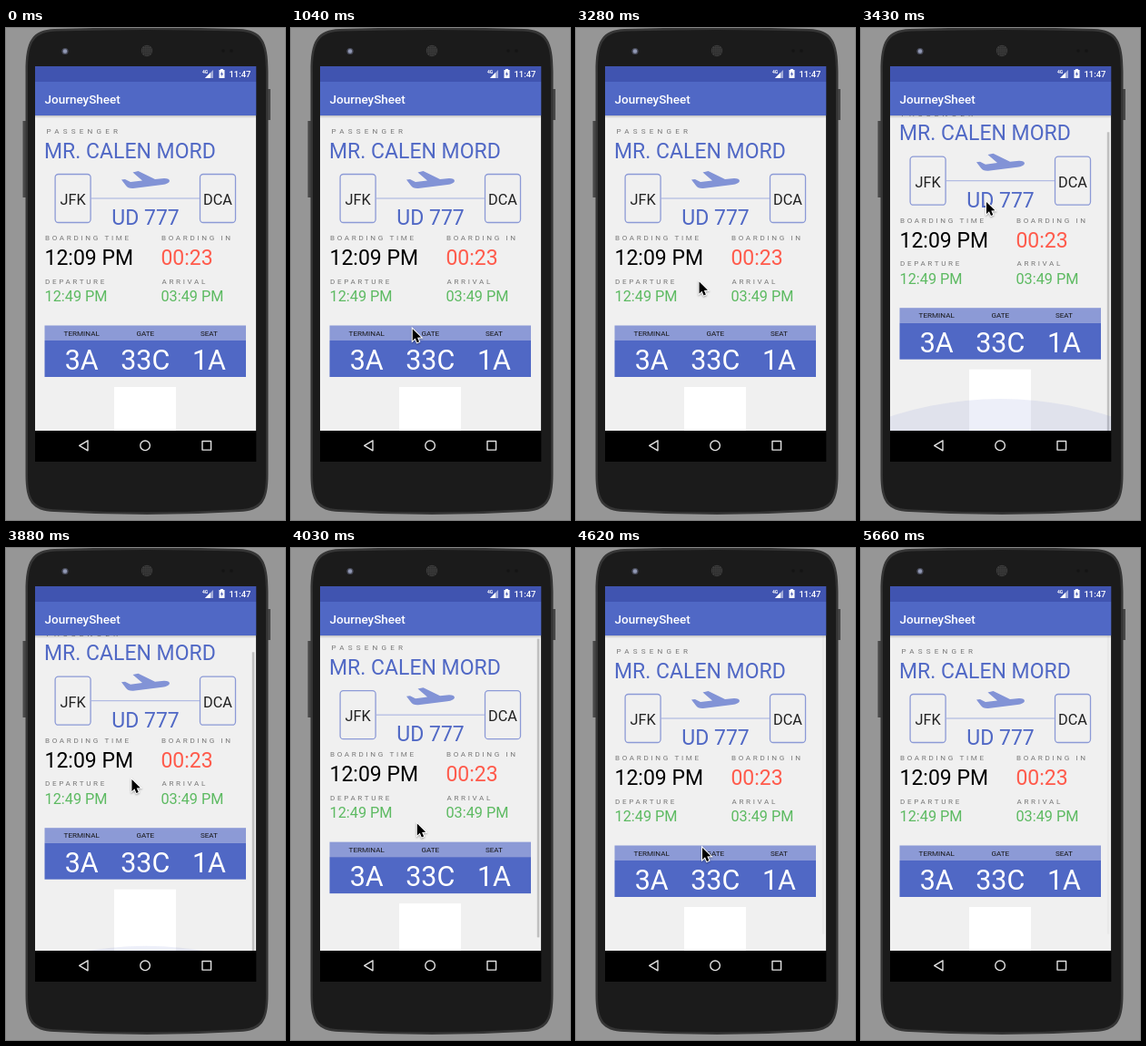
An HTML page with a canvas for the animation above (6060 ms loop, 307x540 px).

```html
<!DOCTYPE html>
<html lang="en">
<head>
<meta charset="utf-8">
<title>Boarding card</title>
<style>
  html, body { margin: 0; width: 100%; height: 100%; overflow: hidden; background: #969696; }
  canvas { display: block; width: 307px; height: 540px; }
</style>
</head>
<body>
<canvas id="stage"></canvas>
<script>
const W = 307, H = 540, LOOP = 6060;
const TICK = 148.75;
const SCREEN = { x: 32, w: 243.3 };
const VIEW = { top: 96, bottom: 442, h: 346 };
const MAX_SCROLL = 19.3;
const BLUE = '#5068c5', PALE = '#8c9ad6', GREEN = '#5dba62', RED = '#ff5b4c', GREY = '#777';

const canvas = document.getElementById('stage');
const ctx = canvas.getContext('2d');
const dpr = window.devicePixelRatio || 1;
canvas.width = W * dpr;
canvas.height = H * dpr;

const clamp = (v, lo, hi) => Math.min(hi, Math.max(lo, v));
const easeIn = n => p => p ** n;
const easeOut = n => p => 1 - (1 - p) ** n;
const linear = easeIn(1);

// Pointer gestures; from and to are counted in ticks.
const SHOWN = { from: 6, to: 38, x: 83, y: 444 };
const GESTURES = [
  { from: 6, to: 8, x: 141, y: 314, ease: easeOut(3) },
  { from: 13, to: 14, x: 140, y: 306, ease: linear },
  { from: 14, to: 15, x: 141, y: 186, ease: linear },
  { from: 16, to: 18, x: 138, y: 285, ease: easeIn(3) },
  { from: 18, to: 21, x: 135, y: 299, ease: linear },
  { from: 21, to: 23, x: 138, y: 191, ease: easeIn(2.4) },
  { from: 25, to: 28, x: 139, y: 329, ease: easeOut(1.5) },
  { from: 34, to: 37, x: 262, y: 504, ease: easeOut(1.7) }
];
const PUSH_END = 23, PULL_END = 28, GRAB_Y = 287;

function pointerAt(tick) {
  let { x, y } = SHOWN;
  for (const g of GESTURES) {
    const p = g.ease(clamp((tick - g.from) / (g.to - g.from), 0, 1));
    x += (g.x - x) * p;
    y += (g.y - y) * p;
  }
  return { x, y, visible: tick >= SHOWN.from && tick < SHOWN.to };
}

// After the push the list rests at its end, then follows the pointer back down.
const scrollAt = (tick, pointerY) =>
  tick < PUSH_END ? 0 : clamp(MAX_SCROLL - (pointerY - GRAB_Y), 0, MAX_SCROLL);

const barAlphaAt = tick =>
  tick < PUSH_END ? 0 : .2 * clamp(1 - (tick - PULL_END) / 3, .15, 1);

function glowAt(tick, start, duration, height) {
  const p = (tick - start) / duration;
  return p < 0 || p >= 1 ? 0 : height * (1 + Math.cos(Math.PI * p)) / 2;
}

function rect(x, y, w, h, color) {
  ctx.fillStyle = color;
  ctx.fillRect(x, y, w, h);
}

function circle(x, y, r, color) {
  ctx.fillStyle = color;
  ctx.beginPath();
  ctx.arc(x, y, r, 0, Math.PI * 2);
  ctx.fill();
}

function polygon(...points) {
  ctx.beginPath();
  points.forEach(([x, y]) => ctx.lineTo(x, y));
  ctx.closePath();
}

function text(str, x, y, size, color, { align = 'left', weight = 400, spacing = 0 } = {}) {
  ctx.font = `${weight} ${size}px Roboto, sans-serif`;
  ctx.letterSpacing = spacing + 'px';
  ctx.textAlign = align;
  ctx.fillStyle = color;
  ctx.fillText(str, x, y);
}

function fillBody(inset, color) {
  const l = 21.5 + inset, r = 288.5 - inset, t = inset, b = 534 - inset;
  ctx.beginPath();
  ctx.moveTo(l, 48);
  ctx.bezierCurveTo(l, 14, l + 7, t + 2, l + 32, t + 1);
  ctx.quadraticCurveTo(155, t - 2, r - 32, t + 1);
  ctx.bezierCurveTo(r - 7, t + 2, r, 14, r, 48);
  ctx.lineTo(r, 490);
  ctx.bezierCurveTo(r, 520, r - 7, b - 4, r - 32, b - 3);
  ctx.quadraticCurveTo(155, b + 3, l + 32, b - 3);
  ctx.bezierCurveTo(l + 7, b - 4, l, 520, l, 490);
  ctx.closePath();
  ctx.fillStyle = color;
  ctx.fill();
}

function drawPhone() {
  rect(0, 0, W, H, '#969696');
  rect(18.5, 102, 4, 84, '#484848');
  rect(287, 67, 4, 34, '#484848');
  fillBody(0, '#353535');
  fillBody(2.5, '#1b1b1b');
  circle(65, 25.5, 3.6, '#4a4d5c');
  circle(65, 25.5, 2.2, '#9198b4');
  circle(155, 25, 6.2, '#3c3c3c');
  for (let i = -2; i <= 2; i++) {
    for (let j = -2; j <= 2; j++) {
      if (i * i + j * j < 6) circle(155 + i * 2.2, 25 + j * 2.2, .6, '#1c1c1c');
    }
  }
  circle(239, 25, 1.8, '#141414');
  circle(248, 25, 1.8, '#141414');
}

function drawBars() {
  const shade = ctx.createLinearGradient(0, VIEW.top, 0, VIEW.top + 3);
  shade.addColorStop(0, 'rgba(0,0,0,.2)');
  shade.addColorStop(1, 'rgba(0,0,0,0)');
  rect(SCREEN.x, VIEW.top, SCREEN.w, 3, shade);

  rect(SCREEN.x, 42, SCREEN.w, 17, '#4054b0');
  rect(SCREEN.x, 59, SCREEN.w, 37, BLUE);
  text('JourneySheet', 42.5, 82.5, 13.5, '#fff', { weight: 500 });

  text('4G', 216, 50, 5, '#fff', { weight: 700 });
  polygon([219, 55], [228, 55], [228, 46]);
  ctx.fillStyle = 'rgba(255,255,255,.5)';
  ctx.fill();
  polygon([219, 55], [225, 55], [225, 49]);
  ctx.fillStyle = '#fff';
  ctx.fill();
  rect(236, 45, 3, 2, '#fff');
  rect(234.5, 46, 6, 9, '#fff');
  polygon([238, 47.5], [236, 51], [237.3, 51], [237, 53.5], [239, 50], [237.8, 50]);
  ctx.fillStyle = '#4054b0';
  ctx.fill();
  text('11:47', 269.5, 54, 9.5, '#fff', { weight: 500, align: 'right' });

  rect(SCREEN.x, VIEW.bottom, SCREEN.w, 34, '#000');
  ctx.strokeStyle = '#e2e2e2';
  ctx.lineWidth = 1.4;
  ctx.lineJoin = 'round';
  polygon([80.7, 458.3], [90, 452.8], [90, 463.8]);
  ctx.stroke();
  ctx.beginPath();
  ctx.arc(153.1, 458.3, 5.3, 0, Math.PI * 2);
  ctx.stroke();
  ctx.strokeRect(216, 453.5, 9.6, 9.6);
}

function drawPlane() {
  ctx.fillStyle = '#8293d6';
  ctx.beginPath();
  ctx.moveTo(127, 166.5);
  ctx.lineTo(131, 166);
  ctx.lineTo(137, 169);
  ctx.lineTo(150, 167.4);
  ctx.lineTo(139.5, 158.4);
  ctx.lineTo(145.5, 157);
  ctx.lineTo(164, 166);
  ctx.lineTo(174, 165);
  ctx.quadraticCurveTo(180, 165.2, 180, 168);
  ctx.quadraticCurveTo(179, 171, 172, 172);
  ctx.lineTo(140, 176);
  ctx.quadraticCurveTo(134, 176.3, 132, 173);
  ctx.closePath();
  ctx.fill();
}

function drawAirport(code, x) {
  ctx.strokeStyle = PALE;
  ctx.lineWidth = 1.3;
  ctx.beginPath();
  ctx.roundRect(x - 19.5, 160.5, 39, 53, 3.5);
  ctx.stroke();
  text(code, x, 194, 16.3, '#222', { align: 'center' });
}

function drawCard() {
  const label = (str, x, y, spacing = 2.65) => text(str, x, y, 8.1, GREY, { spacing });

  label('PASSENGER', 44.5, 116, 4.2);
  text('MR. CALEN MORD', 42, 142.5, 23, BLUE);

  drawAirport('JFK', 73.6);
  drawAirport('DCA', 233);
  rect(94, 186.5, 119, 1, '#a3afe0');
  drawPlane();
  text('UD 777', 153.5, 216, 23, BLUE, { align: 'center' });

  label('BOARDING TIME', 43, 233.3);
  label('BOARDING IN', 171, 233.3);
  text('12:09 PM', 42.5, 260, 23, '#000');
  text('00:23', 170.4, 260, 23, RED);
  label('DEPARTURE', 43, 280.6);
  label('ARRIVAL', 171.5, 280.6);
  text('12:49 PM', 42.5, 300.1, 16.3, GREEN);
  text('03:49 PM', 170.4, 300.1, 16.3, GREEN);

  rect(42.5, 326.5, 221.5, 16.5, PALE);
  rect(42.5, 343, 221.5, 40, BLUE);
  [['TERMINAL', '3A'], ['GATE', '33C'], ['SEAT', '1A']].forEach(([head, value], i) => {
    const x = 83.2 + i * 70.1;
    text(head, x, 337.7, 8.1, '#161616', { align: 'center' });
    text(value, x, 375, 30.5, '#fff', { align: 'center' });
  });

  rect(119, 394, 68, 68, '#fff');
}

// Shallow arc that bulges from the top (dir 1) or bottom (dir -1) edge of the list.
function drawGlow(edge, height, dir) {
  const r = 390;
  if (height) circle(SCREEN.x + SCREEN.w / 2, edge + dir * (height - r), r, 'rgba(80,104,197,.1)');
}

function drawScrollbar(scroll, alpha) {
  const ratio = VIEW.h / (VIEW.h + MAX_SCROLL);
  rect(270.8, VIEW.top + scroll * ratio, 2.6, VIEW.h * ratio, `rgba(0,0,0,${alpha})`);
}

function drawPointer(x, y) {
  ctx.save();
  ctx.translate(x, y);
  polygon([0, 0], [0, 13], [3, 10.3], [5, 15], [7.3, 14], [5.3, 9.5], [9.4, 9.3]);
  ctx.shadowColor = 'rgba(0,0,0,.35)';
  ctx.shadowBlur = 2 * dpr;
  ctx.shadowOffsetY = dpr;
  ctx.lineJoin = 'miter';
  ctx.strokeStyle = '#fff';
  ctx.lineWidth = 2;
  ctx.stroke();
  ctx.shadowColor = 'transparent';
  ctx.fillStyle = '#000';
  ctx.fill();
  ctx.restore();
}

function draw(t) {
  const tick = Math.floor((t + 2) / TICK);
  const pointer = pointerAt(tick);
  const scroll = scrollAt(tick, pointer.y);

  ctx.setTransform(dpr, 0, 0, dpr, 0, 0);
  drawPhone();

  ctx.save();
  ctx.beginPath();
  ctx.rect(SCREEN.x, VIEW.top, SCREEN.w, VIEW.h);
  ctx.clip();
  rect(SCREEN.x, VIEW.top, SCREEN.w, VIEW.h, '#f0f0f0');
  ctx.save();
  ctx.translate(0, -scroll);
  drawCard();
  ctx.restore();
  drawScrollbar(scroll, barAlphaAt(tick));
  drawGlow(VIEW.bottom, glowAt(tick, PUSH_END, 4, 35), -1);
  drawGlow(VIEW.top, glowAt(tick, PULL_END, 2, 38), 1);
  ctx.restore();

  drawBars();
  if (pointer.visible) drawPointer(pointer.x, pointer.y);
}

const start = performance.now();
function frame() {
  draw((performance.now() - start) % LOOP);
  requestAnimationFrame(frame);
}
frame();
</script>
</body>
</html>
```
